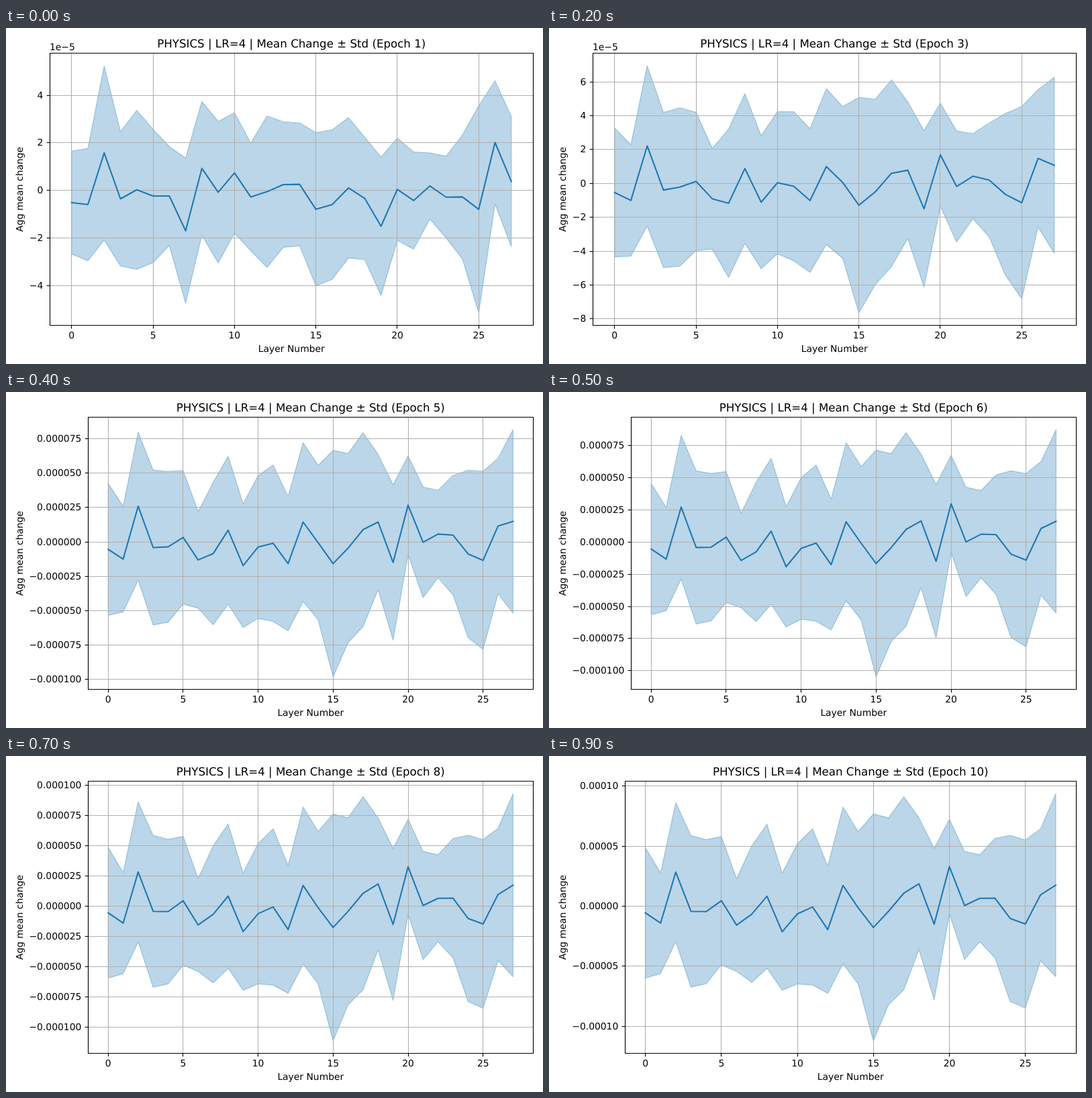
An HTML page with a canvas that plays this animation: 800 by 500 pixels, repeating every 1000 ms.

```html
<!DOCTYPE html>
<html lang="en">
<head>
<meta charset="utf-8">
<title>Mean change per layer</title>
<style>
  html, body { margin: 0; width: 100%; height: 100%; overflow: hidden; background: #fff; }
  canvas { display: block; }
</style>
</head>
<body>
<canvas id="chart" width="800" height="500"></canvas>
<script>
const ctx = document.getElementById('chart').getContext('2d');
const TOP = 37.7, BOTTOM = 442.4, RIGHT = 785.55;
const PT = 100 / 72; // pixels per point
const BLUE = '#1f77b4', GRID = '#b0b0b0', BLACK = '#000';
const EPOCHS = 10, STEP_MS = 100;

// Per layer, in units of 1e-7: the first epoch and the state training settles into.
const first = {
  mean: [-51, -59, 158, -35, 3, -23, -23, -169, 93, -7, 74, -27, -5, 25,
    26, -79, -59, 11, -33, -150, 5, -42, 19, -28, -27, -79, 202, 38],
  std: [216, 236, 366, 282, 334, 280, 208, 305, 281, 297, 253, 226, 318, 264,
    258, 322, 314, 295, 257, 291, 215, 204, 139, 172, 261, 435, 259, 274],
};
const settled = {
  mean: [-55, -141, 284, -43, -45, 46, -157, -66, 83, -213, -64, -6, -195, 173,
    -13, -177, -42, 108, 187, -150, 330, 6, 66, 67, -102, -148, 95, 175],
  std: [544, 420, 580, 631, 600, 535, 386, 569, 600, 487, 584, 651, 530, 653,
    635, 945, 778, 804, 549, 631, 395, 450, 362, 498, 692, 700, 550, 762],
};

// Fast early change that levels off; the result is in units of 1e-5.
function valuesAt(epoch, key) {
  const w = 1 - ((EPOCHS - epoch) / (EPOCHS - 1)) ** 2.8;
  return first[key].map((v, i) => (v + (settled[key][i] - v) * w) / 100);
}

const snap = v => Math.floor(v) + 0.5;

function text(str, x, y, align = 'center', size = 10) {
  ctx.font = `${size * PT}px "DejaVu Sans", sans-serif`;
  ctx.textRendering = 'geometricPrecision';
  ctx.textAlign = align;
  ctx.fillStyle = BLACK;
  ctx.fillText(str, x, y);
}

function path(points) {
  ctx.beginPath();
  for (const [x, y] of points) ctx.lineTo(x, y);
}

function stroke(color, width) {
  ctx.strokeStyle = color;
  ctx.lineWidth = width * PT;
  ctx.stroke();
}

function line(x1, y1, x2, y2, color) {
  path([[x1, y1], [x2, y2]]);
  stroke(color, 0.8);
}

// Limits with a 5 % margin, a round step of at most nine intervals, and label style.
function makeAxis(low, high) {
  const pad = (high - low) * 0.05;
  low -= pad;
  high += pad;
  const step = [1, 2, 2.5, 5].find(s => (high - low) / s <= 9);
  const ticks = [];
  for (let n = Math.ceil(low / step); n * step <= high; n++) ticks.push(n * step);
  const sci = ticks.every(t => Math.abs(t) < 10);
  const digits = (sci ? 0 : 5) + (step % 1 ? 1 : 0);
  const left = { 0: 65, 1: 78, 5: 113, 6: 122.05 }[digits];
  const label = t => (t < 0 ? '\u2212' : '') + Math.abs(sci ? t : t * 1e-5).toFixed(digits);
  return { low, high, ticks, sci, left, label };
}

function draw(epoch) {
  const mean = valuesAt(epoch, 'mean'), std = valuesAt(epoch, 'std');
  const upper = mean.map((m, i) => m + std[i]);
  const lower = mean.map((m, i) => m - std[i]);
  const axis = makeAxis(Math.min(...lower), Math.max(...upper));
  const { left } = axis;
  const width = RIGHT - left, center = left + width / 2;
  const px = i => left + width * (1 / 22 + i / 27 / 1.1);
  const py = v => BOTTOM - (v - axis.low) / (axis.high - axis.low) * (BOTTOM - TOP);
  const curve = list => list.map((v, i) => [px(i), py(v)]);

  ctx.fillStyle = '#fff';
  ctx.fillRect(0, 0, 800, 500);
  ctx.lineJoin = 'round';

  path([...curve(upper), ...curve(lower).reverse()]);
  ctx.closePath();
  ctx.globalAlpha = 0.3;
  ctx.fillStyle = BLUE;
  ctx.fill();
  stroke(BLUE, 1);
  ctx.globalAlpha = 1;

  const edge = snap(left), base = snap(BOTTOM), tick = 3.5 * PT;
  for (let i = 0; i <= 25; i += 5) {
    const x = snap(px(i));
    line(x, TOP, x, BOTTOM, GRID);
    line(x, base, x, base + tick, BLACK);
    text(i, px(i), 462);
  }
  for (const t of axis.ticks) {
    const y = snap(py(t));
    line(left, y, RIGHT, y, GRID);
    line(edge - tick, y, edge, y, BLACK);
    text(axis.label(t), left - 2 * tick, y + 4.5, 'right');
  }

  path(curve(mean));
  ctx.lineCap = 'square';
  stroke(BLUE, 1.5);
  ctx.lineCap = 'butt';

  ctx.lineJoin = 'miter';
  ctx.beginPath();
  ctx.rect(edge, snap(TOP), snap(RIGHT) - edge, base - snap(TOP));
  stroke(BLACK, 0.8);

  text(`PHYSICS | LR=4 | Mean Change ± Std (Epoch ${epoch})`, center, 29, 'center', 12);
  text('Layer Number', center, 482);
  if (axis.sci) text('1e\u22125', left, 33, 'left');
  ctx.save();
  ctx.translate(25, (TOP + BOTTOM) / 2);
  ctx.rotate(-Math.PI / 2);
  text('Agg mean change', 0, 0);
  ctx.restore();
}

const start = performance.now();
function frame() {
  const steps = Math.floor((performance.now() - start) / STEP_MS);
  draw(1 + steps % EPOCHS);
  requestAnimationFrame(frame);
}
frame();
</script>
</body>
</html>
```
